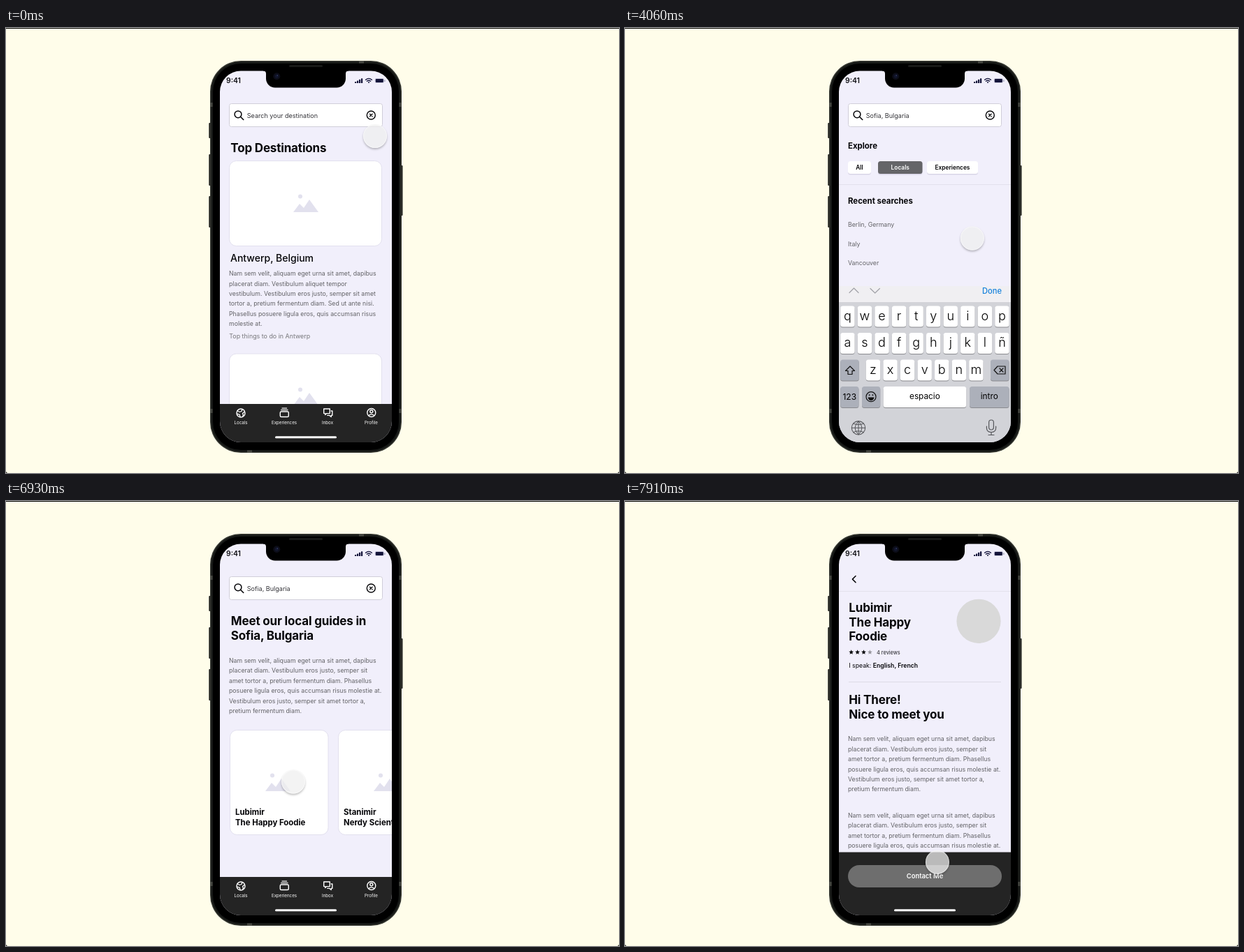
An HTML page for the animation above (8000 ms loop, 877 px wide and 638 px high).

```html
<!DOCTYPE html>
<html lang="en">
<head>
<meta charset="utf-8">
<title>Travel app walkthrough</title>
<style>
html, body { margin: 0; width: 100%; height: 100%; overflow: hidden; background: #fffdea; }
svg { position: absolute; left: 0; top: 0; font-family: Inter, "Open Sans", sans-serif; }
#cursor {
  position: absolute; left: -17px; top: -17px; width: 34px; height: 34px; border-radius: 50%;
  background: rgba(239, 239, 239, .74);
  box-shadow: 0 2px 3px rgba(0, 0, 0, .25), inset 0 0 1px 1px rgba(255, 255, 255, .5);
}
</style>
</head>
<body>
<svg id="stage" width="877" height="638" viewBox="0 0 877 638"></svg>
<div id="cursor"></div>
<script>
const LAVENDER = '#f1effb', DARK = '#242424', INK = '#050508', GREY = '#626266';

const rect = (x, y, w, h, fill, r = 0, extra = '') =>
  `<rect x="${x}" y="${y}" width="${w}" height="${h}" rx="${r}" fill="${fill}" ${extra}/>`;
const circle = (x, y, r, fill, extra = '') =>
  `<circle cx="${x}" cy="${y}" r="${r}" fill="${fill}" ${extra}/>`;
const line = (d, stroke = INK, width = 1.4) =>
  `<path d="${d}" fill="none" stroke="${stroke}" stroke-width="${width}" stroke-linecap="round" stroke-linejoin="round"/>`;
const text = (x, y, str, size, weight = 400, fill = INK, extra = '') =>
  `<text x="${x}" y="${y}" font-size="${size}" font-weight="${weight}" fill="${fill}" ${extra}>${str}</text>`;
const centred = (x, y, str, size, weight, fill) =>
  text(x, y, str, size, weight, fill, 'text-anchor="middle"');
const lines = (x, y, step, list, draw) =>
  list.map((str, i) => draw(x, y + i * step, str)).join('');
const title = (x, y, ...list) =>
  lines(x, y, 20.5, list, (a, b, s) => text(a, b, s, 17, 700, INK, 'letter-spacing="-.17"'));
const body = (y, ...list) =>
  lines(319, y, 14.42, list, (a, b, s) => text(a, b, s, 8.75, 400, GREY));
const move = (x, y, inner) => `<g transform="translate(${x} ${y})">${inner}</g>`;

const lorem = [
  'Nam sem velit, aliquam eget urna sit amet, dapibus',
  'placerat diam. Vestibulum eros justo, semper sit',
  'amet tortor a, pretium fermentum diam. Phasellus',
  'posuere ligula eros, quis accumsan risus molestie at.',
  'Vestibulum eros justo, semper sit amet tortor a,',
  'pretium fermentum diam.'];

const card = (x, y, w, h) => rect(x, y, w, h, '#fff', 10, 'stroke="#e2e0ee"');
const picture = (x, y) => move(x, y,
  circle(10, -4.5, 3, '#e2e1ee') +
  '<path d="M0 18l9-12 6 6 8-12 13 18z" fill="#e2e1ee"/>');
const homeBar = rect(385, 585.3, 88, 3, '#fff', 1.5);

function statusBar() {
  const navy = '#14143a';
  let out = text(315, 78.6, '9:41', 10.4, 600, '#101014');
  for (let i = 0; i < 4; i++)
    out += rect(499 + i * 3, 77 - i * 1.6, 2.2, 2 + i * 1.6, navy, .6);
  return out +
    line('M514.6 74.2q4.4-3.6 8.8 0M516.3 76.2q2.7-2 5.4 0', navy, 1.4) +
    circle(519, 78, 1, navy) +
    rect(527.8, 72, 13, 7, '#c9c8dc', 2) + rect(528.8, 73, 11, 5, navy, 1) +
    rect(541.4, 74.3, 1, 2.6, '#8a89a5', .5);
}

const page = inner => rect(306, 61, 246, 533, LAVENDER) + statusBar() + inner;

const searchField = str =>
  rect(319.5, 108.5, 219, 33, '#fff', 3, 'stroke="#d0ced9"') +
  circle(332, 123.8, 4.9, 'none', `stroke="${INK}" stroke-width="1.5"`) +
  line('M335.7 127.5l4 4', INK, 1.6) +
  text(344.8, 128.8, str, 9.05, 400, '#333338') +
  circle(522.3, 125, 6, 'none', `stroke="${INK}" stroke-width="1.4"`) +
  line('M520.5 123.200l3.600 3.600m0-3.600l-3.600 3.600', INK, 1.3);

function navBar() {
  const w = '#fff', ring = `stroke="${w}" stroke-width="1.4"`;
  const label = (x, str) => centred(x, 568.3, str, 6.2, 400, w);
  return rect(306, 539, 246, 55, DARK) +
    circle(336, 552, 6, 'none', ring) +
    line('M331 549l3 1.5 3-1 1-3M330.5 553l3.5 1 1 3.5M341.5 550l-3 2.5 1 2.5-1 2', w, 1.3) +
    rect(392.3, 550, 12, 7.5, 'none', 1.5, ring) + line('M393.6 547.6h9.4M395 545.2h6.6', w, 1.3) +
    line('M454.7 546h8.6v6.6h-4.6l-2 2v-2h-2zM465.2 549h1.6v6.4h-1.6v2.2l-2.4-2.2h-3', w, 1.4) +
    circle(522.8, 551.5, 6, 'none', ring) + circle(522.8, 549.8, 2, 'none', ring) +
    line('M518.8 555.5q4-3.4 8 0', w, 1.3) +
    label(336, 'Locals') + label(398, 'Experiences') + label(460, 'Inbox') + label(522.5, 'Profile') +
    homeBar;
}

const home = page(
  searchField('Search your destination') + title(321.3, 178, 'Top Destinations') +
  card(319.5, 190.5, 218, 122) + picture(411, 246) +
  text(321, 335, 'Antwerp, Belgium', 14, 500) +
  body(355.2, lorem[0], 'placerat diam. Vestibulum aliquet tempor',
    'vestibulum. Vestibulum eros justo, semper sit amet',
    'tortor a, pretium fermentum diam. Sed ut ante nisi.',
    'Phasellus posuere ligula eros, quis accumsan risus', 'molestie at.') +
  text(319.3, 445.2, 'Top things to do in Antwerp', 8.9, 400, '#77777b') +
  card(319.5, 467, 218, 122) + picture(411, 523) + navBar());

function keyboard() {
  const light = '#fff', mid = '#acb0ba';
  const key = (x, y, w, fill, str = '', size = 18, dy = 20, weight = 300) =>
    rect(x, y + 1, w, 30, '#898a8e', 3.5) + rect(x, y, w, 30, fill, 3.5) +
    centred(x + w / 2, y + dy, str, size, weight, '#000');
  const row = (x, y, chars) =>
    [...chars].map((c, i) => key(x + i * 24.56, y, 20.4, light, c)).join('');
  return rect(306, 370, 246, 23, '#f0eff2') +
    line('M321 379.5l6.5-6.5 6.5 6.5M351 373.5l6.7 6.5 6.7-6.5', '#a2a2a8', 1.2) +
    text(511, 380.8, 'Done', 11.1, 500, '#1481dc') +
    rect(306, 393, 246, 201, '#d2d3d8') +
    row(308.2, 398.5, 'qwertyuiop') + row(308.2, 437, 'asdfghjklñ') + row(344.8, 475.5, 'zxcvbnm') +
    key(308.2, 475.5, 26.5, mid) + line('M322 485l-6.5 6.5h3.5v5h6v-5h3.5z', '#111', 1.2) +
    key(523, 475.5, 26.5, mid) +
    line('M528 490.5l5-5.5h11v11h-11zM536 488l5 5m0-5l-5 5', '#111', 1.2) +
    key(308.2, 514, 26.2, mid, '123', 12, 18.6, 400) +
    key(339, 514, 26.2, mid) +
    circle(352, 528.7, 7, 'none', 'stroke="#111" stroke-width="1.2"') +
    circle(349.6, 526.3, 1, '#111') + circle(354.4, 526.3, 1, '#111') +
    '<path d="M347.5 529.5h9q-1 4.5-4.5 4.5t-4.5-4.5z" fill="#111"/>' +
    key(369.6, 514, 118.6, light, 'espacio', 11.8, 18, 400) +
    key(493, 514, 56.5, mid, 'intro', 11.8, 18, 400) +
    circle(334, 573.3, 9.7, 'none', 'stroke="#55565a" stroke-width="1.1"') +
    line('M324.5 573.3h19M334 563.6v19.4M326.6 567q7.4 3.6 14.8 0M326.6 579.6q7.4-3.6 14.8 0M334 563.6q-10 9.7 0 19.4q10-9.7 0-19.4', '#55565a', 1) +
    rect(520.6, 562, 6.8, 14, 'none', 3.4, 'stroke="#55565a" stroke-width="1.2"') +
    line('M517.4 571v2.5q0 6 6.6 6t6.6-6V571M524 579.5v4M520 583.5h8', '#55565a', 1.2);
}

const chip = (x, w, str, fill, ink) =>
  rect(x, 192, w, 18.5, 'rgba(40,30,80,.12)', 3.5) + rect(x, 191, w, 18, fill, 3.5) +
  centred(x + w / 2, 203, str, 8.35, 600, ink);

const search = page(
  searchField('Sofia, Bulgaria') +
  text(319, 173, 'Explore', 11.4, 700) +
  chip(319, 33, 'All', '#fff', INK) + chip(362, 63.5, 'Locals', '#656568', '#fff') +
  chip(432, 73, 'Experiences', '#fff', INK) +
  rect(306, 224, 246, 1, '#e3e1ec') +
  text(319, 251.5, 'Recent searches', 11.4, 700) +
  lines(319, 285, 27.5, ['Berlin, Germany', 'Italy', 'Vancouver'],
    (x, y, s) => text(x, y, s, 8.75, 400, GREY)) +
  keyboard());

const guide = (x, ...names) =>
  card(x, 328.5, 140.5, 150) + picture(x + 50.5, 398) +
  lines(x + 7.5, 450.3, 14.6, names, (a, b, s) => text(a, b, s, 11.4, 700));

const guides = page(
  searchField('Sofia, Bulgaria') +
  title(321.8, 178, 'Meet our local guides in', 'Sofia, Bulgaria') +
  body(232, ...lorem) +
  guide(320.5, 'Lubimir', 'The Happy Foodie') + guide(475.5, 'Stanimir', 'Nerdy Scientist') +
  navBar());

function star(x, y, fill) {
  const pts = Array.from({ length: 10 }, (_, i) => {
    const r = i % 2 ? 1.6 : 3.6, a = i * Math.PI / 5;
    return `${x + r * Math.sin(a)},${y - r * Math.cos(a)}`;
  });
  return `<polygon points="${pts.join(' ')}" fill="${fill}"/>`;
}

const profile = page(
  line('M330 107.5l-4.6 4.6 4.6 4.6', INK, 1.5) +
  rect(306, 129, 246, 1, '#e3e1ec') +
  title(320.3, 159, 'Lubimir', 'The Happy', 'Foodie') +
  circle(506, 172.3, 31.6, '#d9d9d9') +
  [0, 1, 2, 3].map(i => star(323.7 + i * 8.9, 216.8, i < 3 ? INK : '#98979e')).join('') +
  text(360, 219.5, '4 reviews', 7.4, 400, '#222226') +
  text(320.3, 239.4, 'I speak: <tspan font-weight="600">English, French</tspan>', 8.7) +
  rect(320, 259, 218, 1, '#dddbe6') +
  title(320.3, 291, 'Hi There!', 'Nice to meet you') +
  body(344.3, ...lorem) + body(453.8, ...lorem) +
  rect(306, 503.5, 246, 91, DARK) + rect(319, 522, 220, 32, '#6e6e6e', 16) +
  centred(429, 541.4, 'Contact Me', 9.4, 600, '#fff') + homeBar);

const band = '#474842', button = '#20211f';
const shell =
  rect(290.3, 136, 3, 22, button, 1) + rect(290.3, 181, 3, 45, button, 1) +
  rect(290.3, 241, 3, 45, button, 1) + rect(564.5, 197, 3, 72, button, 1) +
  rect(292, 47, 274, 562, '#33352f', 44) + rect(293.5, 48.5, 271, 559, '#161816', 42.5) +
  [[292, 107, 3.5, 6], [562.5, 107, 3.5, 6], [292, 546, 3.5, 6], [562.5, 546, 3.5, 6],
   [505, 47, 7, 3.5], [345, 605.5, 7, 3.5]].map(b => rect(...b, band)).join('') +
  rect(296, 51, 266, 554, '#000', 40);
const notch =
  '<path d="M368 60h122v1.5a4 4 0 0 0-4 4v7a13 13 0 0 1-13 13h-88a13 13 0 0 1-13-13v-7a4 4 0 0 0-4-4z" fill="#000"/>' +
  rect(405, 53, 48, 3, '#191a18', 1.5) +
  circle(387.3, 69.2, 5, '#0c0d18') + circle(387.3, 69.2, 2.6, '#12162c') + circle(388.3, 68, .8, '#3c4674');

const screens = { home, search, guides, profile };
document.getElementById('stage').innerHTML =
  '<clipPath id="glass"><rect x="306" y="61.5" width="246" height="532.5" rx="30"/></clipPath>' +
  rect(0, 0, 877, 638, '#fffdea') + rect(0, 0, 877, 1, '#0c0c0a') +
  '<path d="M0 636v2h2zM877 636v2h-2z" fill="#33332c"/>' +
  shell + '<g clip-path="url(#glass)">' +
  Object.entries(screens).map(([id, art]) =>
    (id === 'profile' ? rect(306, 61, 246, 533, '#000', 0, 'id="shade"') : '') +
    `<g id="${id}">${art}</g>`).join('') +
  '</g>' + notch;

const el = id => document.getElementById(id);
const clamp = v => Math.min(1, Math.max(0, v));
const smooth = v => v * v * (3 - 2 * v);

// Cursor moves: start, end, target x, y and an optional curve control point.
const moves = [
  [280, 840, 525, 125], [1050, 1540, 522, 125], [2700, 2940, 516, 133],
  [3080, 3570, 488, 276], [3780, 4620, 522, 374], [5390, 6090, 414, 402, 470, 335],
  [6230, 6510, 411, 402.5], [7630, 7920, 447, 518]];

function cursorAt(t) {
  let x = 528, y = 155;
  for (const [start, end, tx, ty, cx = (x + tx) / 2, cy = (y + ty) / 2] of moves) {
    if (t < start) break;
    const p = smooth(clamp((t - start) / (end - start))), q = 1 - p;
    x = q * q * x + 2 * p * q * cx + p * p * tx;
    y = q * q * y + 2 * p * q * cy + p * p * ty;
  }
  return [x, y];
}

function draw() {
  const t = performance.now() % 8000;
  const push = 1 - (1 - clamp((t - 6950) / 350)) ** 3;
  const show = (id, on) => el(id).style.display = on ? '' : 'none';
  show('home', t < 1820);
  show('search', t >= 1820 && t < 4830);
  show('guides', t >= 4830 && push < 1);
  show('profile', push > 0);
  el('guides').setAttribute('transform', `translate(${-61.5 * push} 0)`);
  el('profile').setAttribute('transform', `translate(${246 * (1 - push)} 0)`);
  el('shade').setAttribute('opacity', push < 1 ? .48 * push : 0);
  const [x, y] = cursorAt(t);
  el('cursor').style.transform = `translate(${x}px, ${y}px)`;
  requestAnimationFrame(draw);
}
draw();
</script>
</body>
</html>
```
